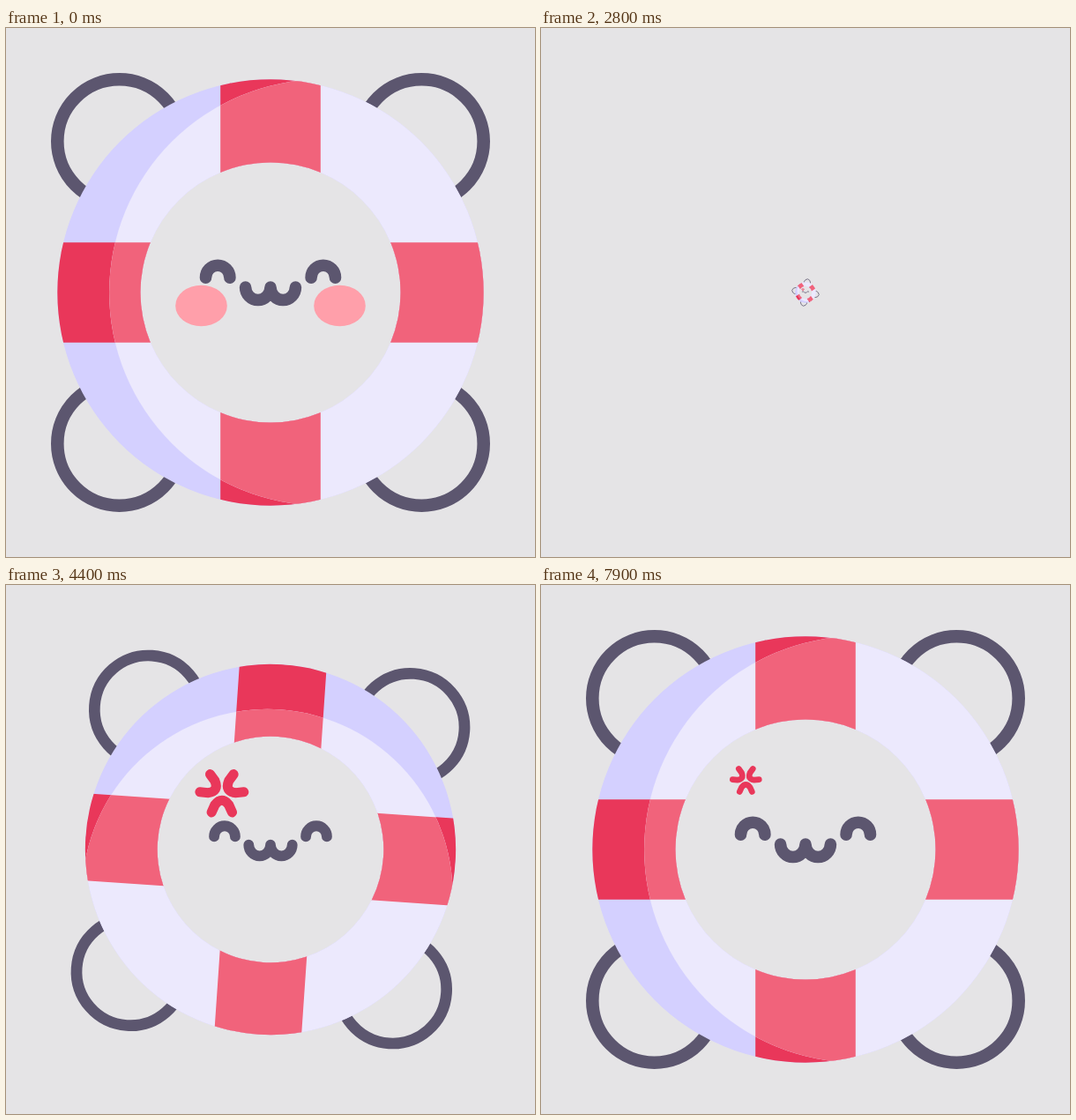
An HTML page that plays this animation: 600 px wide and 600 px high, repeating every 8 s.

```html
<!DOCTYPE html>
<html lang="en">
<head>
<meta charset="utf-8">
<title>Lifebuoy</title>
<style>
  html, body { margin: 0; width: 100%; height: 100%; overflow: hidden; background: #e5e4e6; }
  svg { display: block; width: 100vw; height: 100vh; }
</style>
</head>
<body>
<svg viewBox="-300 -300 600 600">
  <defs>
    <clipPath id="annulus">
      <path clip-rule="evenodd" d="M-241.7 0a241.7 241.7 0 1 0 483.4 0a241.7 241.7 0 1 0 -483.4 0zM-147.5 0a147.5 147.5 0 1 0 295 0a147.5 147.5 0 1 0 -295 0z"/>
    </clipPath>
    <clipPath id="lit"><circle cx="58.8" r="241.7"/></clipPath>
    <path id="bands" d="M-56.8 -250h113.6v500h-113.6zM-250 -56.8h500v113.6h-500z"/>
    <path id="vein" d="M-14 26.5L-9.5 16.5Q0 4 9.5 16.5L14 26.5"/>
  </defs>

  <g id="buoy">
    <g fill="none" stroke="#5c566f" stroke-width="14.6">
      <circle cx="-171.4" cy="-171.4" r="70.3"/>
      <circle cx="171.4" cy="-171.4" r="70.3"/>
      <circle cx="-171.4" cy="171.4" r="70.3"/>
      <circle cx="171.4" cy="171.4" r="70.3"/>
    </g>
    <g clip-path="url(#annulus)">
      <circle r="245" fill="#d4d0ff"/>
      <use href="#bands" fill="#e9375a"/>
      <g clip-path="url(#lit)">
        <circle r="245" fill="#ece9fd"/>
        <use href="#bands" fill="#f1637b"/>
      </g>
    </g>
  </g>

  <g id="face">
    <g fill="none" stroke="#5c566f" stroke-width="13.6" stroke-linecap="round" stroke-linejoin="round">
      <path d="M-73.5 -16.8a13.7 14 0 0 1 27.4 0"/>
      <path d="M46.1 -16.8a13.7 14 0 0 1 27.4 0"/>
      <path d="M-28.4 -6a14.2 14.5 0 0 0 28.4 0a14.2 14.5 0 0 0 28.4 0"/>
    </g>
    <g id="cheeks" fill="#ff9faa">
      <ellipse cx="-78.5" cy="15" rx="29.3" ry="23.3"/>
      <ellipse cx="78.5" cy="15" rx="29.3" ry="23.3"/>
    </g>
  </g>

  <g id="anger" fill="none" stroke="#e9375a" stroke-width="13.4" stroke-linecap="round">
    <use href="#vein"/>
    <use href="#vein" transform="rotate(120)"/>
    <use href="#vein" transform="rotate(240)"/>
  </g>
</svg>
<script>
  const LOOP = 8000;
  const SHRINK = 966.7, SWAP = 2466.7, FULL = 4966.7;
  const POPPED = 5133.3, BEAT = 553.3, LOW = 0.49;
  const [buoy, face, cheeks, anger] =
    ["buoy", "face", "cheeks", "anger"].map(id => document.getElementById(id));

  // Eased progress from 0 to 1 between two times
  function ease(t, from, to) {
    const x = Math.min(1, Math.max(0, (t - from) / (to - from)));
    return x * x * (3 - 2 * x);
  }

  function pulse(t) {
    if (t < POPPED) return 1;
    const phase = (t - POPPED) / BEAT % 2;
    return 1 - (1 - LOW) * ease(1 - Math.abs(1 - phase), 0, 1);
  }

  function draw(t) {
    const size = t < SWAP ? 1 - ease(t, SHRINK, SWAP) : ease(t, SWAP, FULL);
    buoy.setAttribute("transform", `rotate(${720 * (1 - size)}) scale(${size})`);
    face.setAttribute("transform", `scale(${size})`);

    const angry = t >= SWAP;
    cheeks.style.display = angry ? "none" : "";
    anger.style.display = angry ? "" : "none";
    const grow = ease(t, SWAP, POPPED);
    anger.setAttribute("transform",
      `scale(${grow}) translate(-67.7 -78.8) scale(${1.02 * pulse(t)})`);
  }

  const start = performance.now();
  function tick() {
    draw((performance.now() - start) % LOOP);
    requestAnimationFrame(tick);
  }
  tick();
</script>
</body>
</html>
```
